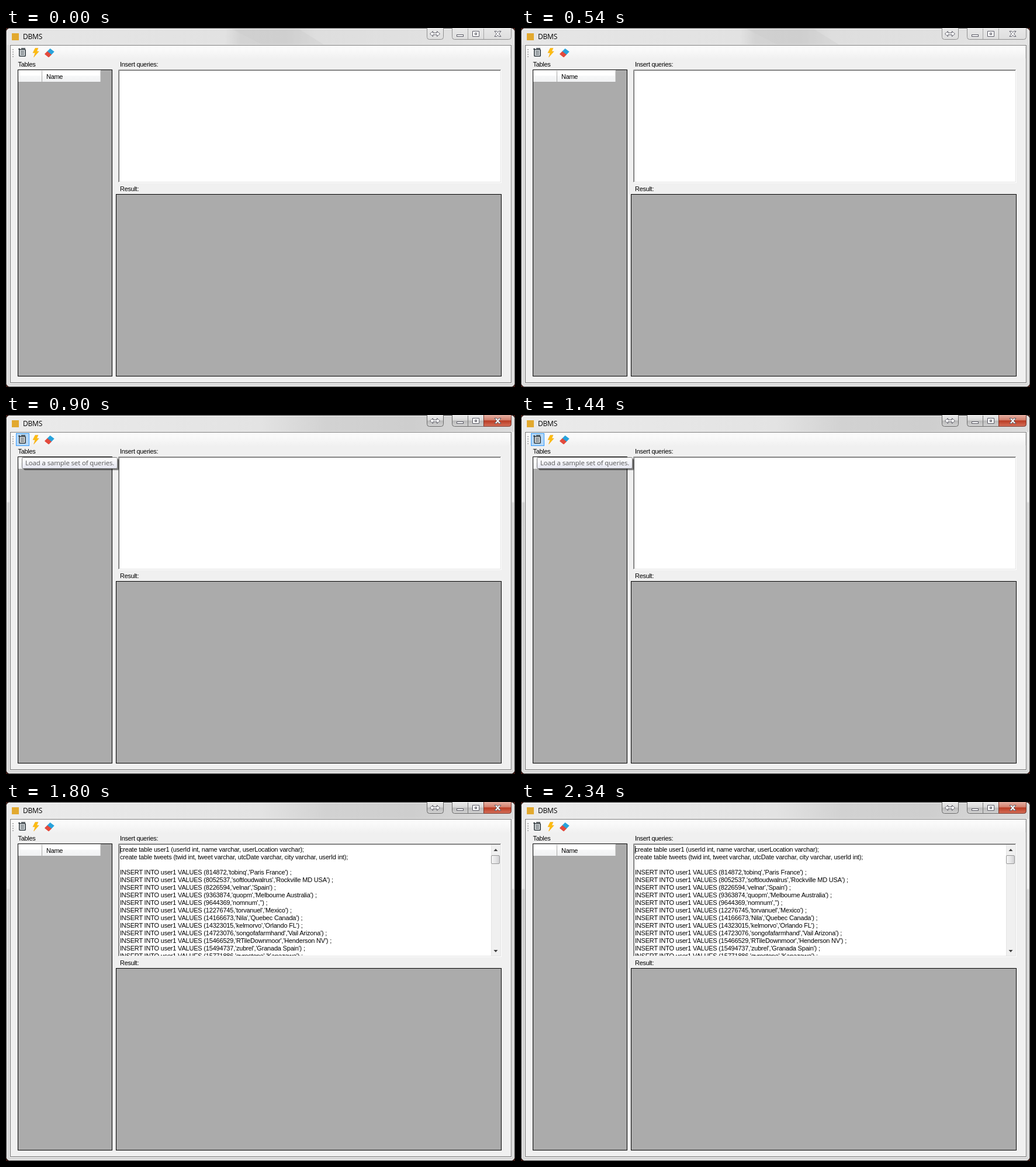
Animation, 871 px wide and 614 px high, one loop 2700 ms. Source, as an HTML page:

```html
<!DOCTYPE html>
<html lang="en">
<head>
<meta charset="utf-8">
<title>DBMS</title>
<style>
  html, body { margin: 0; width: 100%; height: 100%; overflow: hidden; background: #3a1712; }
  svg { display: block; width: 871px; height: 614px; }
  text { font: 11px "Liberation Sans", Arial, sans-serif; letter-spacing: -.2px; white-space: pre; }
  .ui { font-family: "Open Sans", "Noto Sans", sans-serif; }
  .label { letter-spacing: -.3px; }
  .idle .active, .hover .inactive, .loaded .inactive { display: none; }
  .tip, .queries { display: none; }
  .hover .tip, .loaded .queries { display: block; }
</style>
</head>
<body>
<svg id="app" class="idle" viewBox="0 0 871 614">
  <defs>
    <linearGradient id="barIdle">
      <stop offset="0" stop-color="#e6e6e6"/><stop offset=".43" stop-color="#e2e2e2"/>
      <stop offset=".46" stop-color="#d3d3d3"/><stop offset=".55" stop-color="#d2d2d2"/>
      <stop offset=".61" stop-color="#dedede"/><stop offset="1" stop-color="#e3e3e3"/>
    </linearGradient>
    <linearGradient id="barActive">
      <stop offset="0" stop-color="#ebebeb"/><stop offset=".5" stop-color="#e3e3e3"/>
      <stop offset=".63" stop-color="#d2d2d2"/><stop offset=".8" stop-color="#cecece"/>
      <stop offset="1" stop-color="#dcdcdc"/>
    </linearGradient>
    <linearGradient id="sideActive" x2="0" y2="1">
      <stop offset="0" stop-color="#ececec"/><stop offset=".24" stop-color="#eaeaea"/>
      <stop offset=".245" stop-color="#d0d0d0"/><stop offset="1" stop-color="#d8d8d8"/>
    </linearGradient>
    <linearGradient id="strip" x2="0" y2="1">
      <stop offset="0" stop-color="#fdfdfd"/><stop offset="1" stop-color="#f0f0f0"/>
    </linearGradient>
    <linearGradient id="head" x2="0" y2="1">
      <stop offset="0" stop-color="#fff"/><stop offset=".45" stop-color="#fff"/>
      <stop offset=".5" stop-color="#f6f7f8"/><stop offset="1" stop-color="#f0f1f3"/>
    </linearGradient>
    <linearGradient id="tipFill" x2="0" y2="1">
      <stop offset="0" stop-color="#fff"/><stop offset="1" stop-color="#e4e5f0"/>
    </linearGradient>
    <linearGradient id="btnIdle" x2="0" y2="1">
      <stop offset="0" stop-color="#e8e8e8"/><stop offset="1" stop-color="#dedede"/>
    </linearGradient>
    <linearGradient id="btnActive" x2="0" y2="1">
      <stop offset="0" stop-color="#ededed"/><stop offset=".48" stop-color="#d6d6d6"/>
      <stop offset=".5" stop-color="#b9b9b9"/><stop offset="1" stop-color="#d3d3d3"/>
    </linearGradient>
    <linearGradient id="close" x2="0" y2="1">
      <stop offset="0" stop-color="#e5b1a4"/><stop offset=".46" stop-color="#d27e6b"/>
      <stop offset=".5" stop-color="#b93a22"/><stop offset="1" stop-color="#d5705a"/>
    </linearGradient>
    <linearGradient id="thumb">
      <stop offset="0" stop-color="#f5f5f5"/><stop offset=".5" stop-color="#e6e6e7"/>
      <stop offset="1" stop-color="#d0d0d2"/>
    </linearGradient>
    <clipPath id="editor"><rect x="194" y="73" width="636" height="190"/></clipPath>
    <path id="right" d="M763.5 0V15.5Q763.5 19.5 767.5 19.5H860.5Q864.5 19.5 864.5 15.5V0"/>
    <path id="swap" d="M720.5 0V15.5Q720.5 19.5 724.5 19.5H744.5Q748.5 19.5 748.5 15.5V0"/>
    <path id="cross" d="M836 5.5h3.6l1.9 2.4 1.9-2.4h3.6l-3.6 4.5 3.6 4.5h-3.6l-1.9-2.4-1.9 2.4h-3.6l3.6-4.5z"/>
  </defs>

  <!-- window frame -->
  <g class="inactive">
    <rect x=".5" y=".5" width="870" height="613" rx="6" fill="#dcdcdc" stroke="#555"/>
    <path d="M1 29V7Q1 1 7 1H864Q870 1 870 7V29z" fill="url(#barIdle)"/>
    <path d="M385 1H500L545 29H440Z" fill="#c9c9c9" opacity=".35"/>
  </g>
  <g class="active">
    <rect x=".5" y=".5" width="870" height="613" rx="6" fill="url(#sideActive)" stroke="#2c2c2c"/>
    <path d="M1 29V7Q1 1 7 1H864Q870 1 870 7V29z" fill="url(#barActive)"/>
  </g>
  <rect x="1.5" y="1.5" width="868" height="611" rx="5" fill="none" stroke="#fff" stroke-opacity=".75"/>
  <rect x="6.5" y="28.5" width="859" height="579" fill="none" stroke="#f6f6f6" stroke-opacity=".8"/>
  <rect x="7.5" y="29.5" width="857" height="577" fill="#f0f0f0" stroke="#757575"/>
  <rect x="10" y="9" width="12" height="12" fill="#e2a92f"/>
  <text class="ui" x="29" y="19" style="font-size:12px">DBMS</text>

  <!-- caption buttons -->
  <g class="inactive" stroke="#8f8f8f">
    <use href="#right" fill="url(#btnIdle)"/><use href="#swap" fill="url(#btnIdle)"/>
    <path d="M790.5 1V19M817.5 1V19" stroke="#a5a5a5"/>
  </g>
  <g class="active" stroke="#6a6a6a">
    <use href="#right" fill="url(#btnActive)"/><use href="#swap" fill="url(#btnActive)"/>
    <path d="M817.5 0V19.5H860.5Q864.5 19.5 864.5 15.5V0" fill="url(#close)" stroke="#7b3a30"/>
    <path d="M790.5 1V19" stroke="#777"/>
  </g>
  <g fill="#fff" stroke="#5b5b66">
    <path d="M725.5 10l5-4.5v3h7v-3l5 4.5-5 4.5v-3h-7v3z"/>
    <rect x="771.5" y="11.5" width="11" height="3"/>
    <path fill-rule="evenodd" d="M798.5 5.5h11v9h-11zM802.5 8.5h3v3h-3z"/>
    <use href="#cross"/>
  </g>

  <!-- tool strip -->
  <rect x="8" y="30" width="856" height="24" fill="url(#strip)"/>
  <path d="M863.5 31V52" stroke="#e2e2e2"/>
  <path d="M12 36V50" stroke="#b4b4b4" stroke-width="2" stroke-dasharray="2"/>
  <rect class="tip" x="17.5" y="31.5" width="22" height="21" fill="#b5d8f7" stroke="#3399ff"/>
  <g fill="none" stroke="#333b40">
    <rect x="22.8" y="36.8" width="10.4" height="11.4" rx="1" fill="#e9eef0" stroke-width="1.6"/>
    <path d="M25 39.5h6M25 41.5h6M25 43.5h6M25 45.5h6" stroke="#50585d"/>
    <path d="M21 36h3M23 34.8v2.4M26 35h7" stroke-width="1.4"/>
  </g>
  <path d="M50 34.5h5l-2.5 5.5h3.8L47.5 50l2.4-7.6H46z" fill="#fcbd10" stroke="#f2a10c" stroke-width=".5"/>
  <path d="M75.5 35l7.2 5.6-4.9 5.2-7.3-5.8z" fill="#28a3dc"/>
  <path d="M70.5 40l7.3 5.8-4 4q-.8.6-1.6 0l-5.6-4.5q-.8-.8 0-1.6z" fill="#e34a3d"/>
  <path d="M70.5 40l7.3 5.8" stroke="#b2473f" stroke-width=".8"/>

  <text class="label" x="20.5" y="66">Tables</text>
  <text class="label" x="195" y="66">Insert queries:</text>
  <text class="label" x="195" y="279">Result:</text>

  <!-- grids -->
  <g fill="#ababab" stroke="#000">
    <rect x="20.5" y="71.5" width="161" height="524"/>
    <rect x="188.5" y="284.5" width="659" height="311"/>
  </g>
  <rect x="21" y="72" width="141" height="20" fill="url(#head)"/>
  <path d="M21 92.5H162M61.5 73V92" stroke="#a8a8a8"/>
  <path d="M161.5 73V92" stroke="#d5d5d5"/>
  <text class="label" x="69" y="87">Name</text>

  <!-- query editor -->
  <rect x="192" y="71" width="656" height="194" fill="#fff"/>
  <path d="M192.5 264V71.5H847" fill="none" stroke="#a0a0a0"/>
  <path d="M193.5 263V72.5H846" fill="none" stroke="#696969"/>
  <path d="M194 263.5H846.5V73" fill="none" stroke="#e3e3e3"/>

  <g class="queries">
    <g id="sql" clip-path="url(#editor)"></g>
    <path d="M195.5 75V88" stroke="#000"/>
    <rect x="830" y="73" width="16" height="190" fill="#f0f0f0"/>
    <path d="M830.5 73V263" stroke="#e5e5e5"/>
    <rect x="830.5" y="91.5" width="14" height="14" rx="1.5" fill="url(#thumb)" stroke="#989898"/>
    <path d="M834.5 84l3.5-4 3.5 4zM834.5 253l3.5 4 3.5-4z" fill="#404040"/>
  </g>

  <!-- tooltip -->
  <g class="tip">
    <rect x="31" y="76" width="163" height="19" rx="2" fill="#000" opacity=".15"/>
    <rect x="30" y="75" width="163" height="19" rx="2" fill="#000" opacity=".4"/>
    <rect x="27.5" y="72.5" width="163" height="19" rx="2" fill="url(#tipFill)" stroke="#767676"/>
    <text class="ui" x="33" y="86" fill="#575757" style="font-size:11.4px;letter-spacing:-.1px">Load a sample set of queries.</text>
  </g>
</svg>
<script>
  const users = [
    [814872, 'tobinq', 'Paris France'],
    [8052537, 'softloudwalrus', 'Rockville MD USA'],
    [8226594, 'velnar', 'Spain'],
    [9363874, 'quopm', 'Melbourne Australia'],
    [9644369, 'nomnum', ''],
    [12276745, 'torvanuel', 'Mexico'],
    [14166673, 'Nila', 'Quebec Canada'],
    [14323015, 'kelmorvo', 'Orlando FL'],
    [14723076, 'songofafarmhand', 'Vail Arizona'],
    [15466529, 'RTileDownmoor', 'Henderson NV'],
    [15494737, 'zubrel', 'Granada Spain'],
    [15771886, 'gyrostone', 'Kanazawa']
  ];
  const lines = [
    'create table user1 (userId int, name varchar, userLocation varchar);',
    'create table tweets (twid int, tweet varchar, utcDate varchar, city varchar, userId int);',
    '',
    ...users.map(([id, name, city]) => `INSERT INTO user1 VALUES (${id},'${name}','${city}') ;`)
  ];
  const sql = document.getElementById('sql');
  lines.forEach((line, i) => {
    const text = document.createElementNS('http://www.w3.org/2000/svg', 'text');
    text.setAttribute('x', 195);
    text.setAttribute('y', 85 + 13 * i);
    text.textContent = line;
    sql.append(text);
  });

  const app = document.getElementById('app');
  const states = ['idle', 'hover', 'loaded'];
  const hold = 900;
  const start = performance.now();
  function tick(now) {
    const step = Math.floor(Math.max(0, now - start) / hold) % states.length;
    app.setAttribute('class', states[step]);
    requestAnimationFrame(tick);
  }
  requestAnimationFrame(tick);
</script>
</body>
</html>
```
